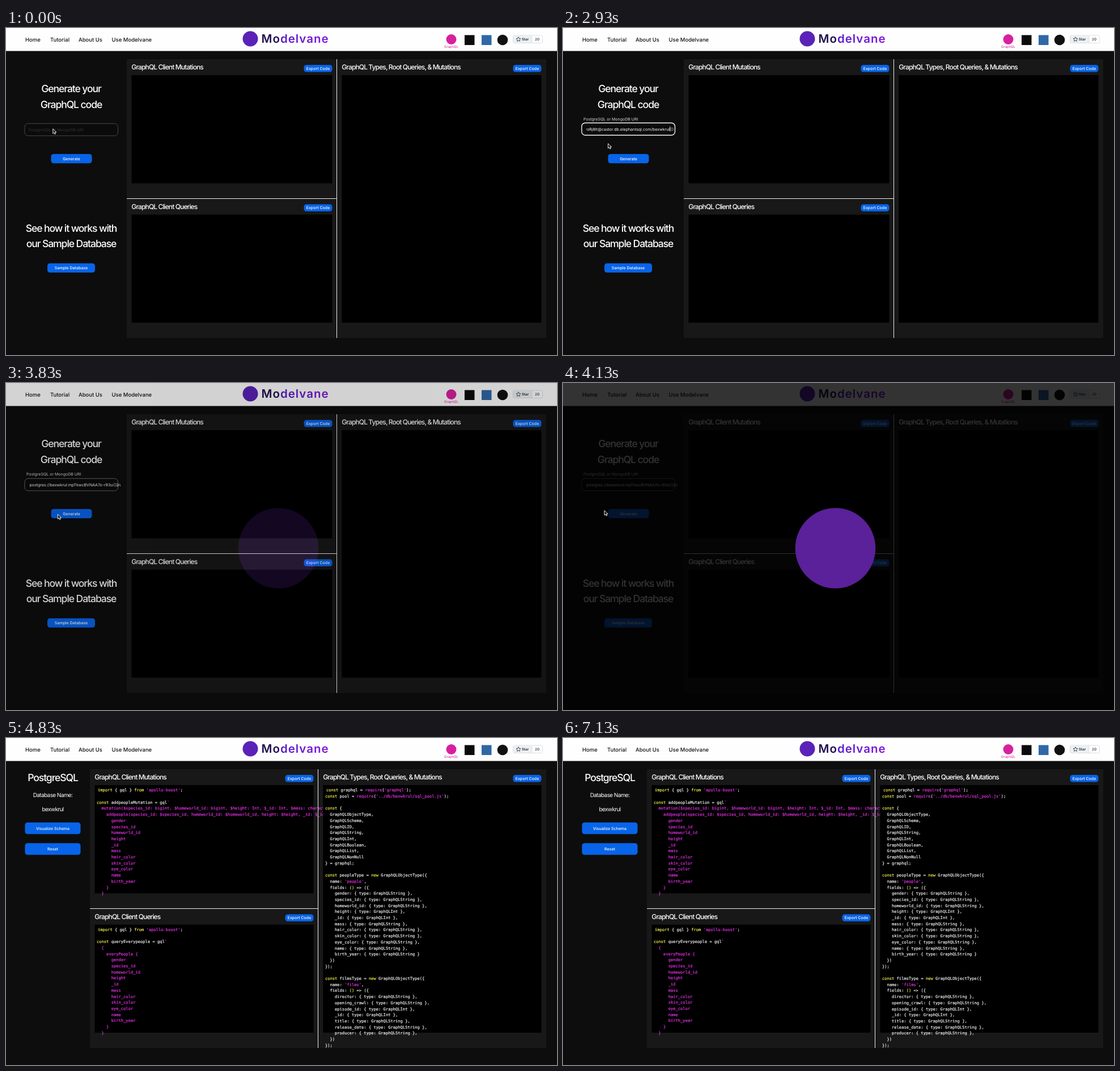
An HTML page that plays this animation: 972 px wide and 576 px high, repeating every 8000 ms.

```html
<!DOCTYPE html>
<html lang="en">
<head>
<meta charset="utf-8">
<title>GraphQL code generator</title>
<style>
html, body { margin: 0; width: 100%; height: 100%; overflow: hidden; background: #0d0d0d; }
svg { display: block; width: 972px; height: 576px; }
svg svg { width: auto; height: auto; }
text { font-family: Inter, "Open Sans", sans-serif; font-size: 7px; fill: #fff; white-space: pre; text-rendering: geometricPrecision; }
.nav { font-size: 9.5px; font-weight: 500; fill: #111; }
.brand { font-size: 20.5px; font-weight: 600; letter-spacing: 1px; fill: url(#purple); }
.title { font-size: 17.6px; font-weight: 500; letter-spacing: -1.1px; }
.head { font-size: 12px; font-weight: 500; letter-spacing: -.88px; }
.info { font-size: 10px; letter-spacing: -.6px; }
.btn { font-weight: 500; }
.mid { text-anchor: middle; }
.code { font-family: "DejaVu Sans Mono", monospace; font-size: 7.12px; fill: #f4f4f4; stroke: #f4f4f4; stroke-width: .18px; }
.key { fill: #f3f04e; stroke: #f3f04e; }
.str { fill: #e832e8; stroke: #e832e8; }
</style>
</head>
<body>
<svg id="stage" viewBox="0 0 972 576"></svg>
<script>
const BRAND = 'Modelvane', USER = 'bexwkrul', LOOP = 8000;
const BLUE = '#0864e8', PITCH = 10.7;

const rect = (x, y, w, h, fill, more = '') =>
  `<rect x="${x}" y="${y}" width="${w}" height="${h}" fill="${fill}" ${more}/>`;
const text = (x, y, cls, s, more = '') => `<text x="${x}" y="${y}" class="${cls}" ${more}>${s}</text>`;
const clip = (x, y, w, h, body) =>
  `<svg x="${x}" y="${y}" style="width:${w}px;height:${h}px">${body}</svg>`;
const button = (x, y, w, h, s, id = '') =>
  `<g id="${id}">${rect(x, y, w, h, BLUE, 'rx="4.5"')}${text(x + w / 2, y + h / 2 + 2.6, 'btn mid', s)}</g>`;

// Code samples
const people = ['gender', 'species_id', 'homeworld_id', 'height', '_id', 'mass',
  'hair_color', 'skin_color', 'eye_color', 'name', 'birth_year'];
const films = ['director', 'opening_crawl', 'episode_id', '_id', 'title', 'release_date', 'producer'];
const importLine = "import { gql } from 'apollo-boost';";
const picked = [...people.map(f => '      ' + f), '    }', '  }'];

const mutations = [importLine, '', 'const addpeopleMutation = gql`',
  '  mutation($species_id: bigint, $homeworld_id: bigint, $height: Int, $_id: Int, $mass: character varying) {',
  '    addpeople(species_id: $species_id, homeworld_id: $homeworld_id, height: $height, _id: $_id) {',
  ...picked];
const queries = [importLine, '', 'const queryEverypeople = gql`', '  {', '    everyPeople {', ...picked];

const typeDef = (name, fields) => [
  `const ${name}Type = new GraphQLObjectType({`, `  name: '${name}',`, '  fields: () => ({',
  ...fields.map(f => {
    const kind = /^(height|_id|episode_id)$/.test(f) ? 'Int' : 'String';
    return `    ${f}: { type: GraphQL${kind} }${f === 'birth_year' ? '' : ','}`;
  }), '  })', '});', ''];
const kinds = ['ObjectType', 'Schema', 'ID', 'String', 'Int', 'Boolean', 'List', 'NonNull'];
const types = ["const graphql = require('graphql');", `const pool = require('../db/${USER}/sql_pool.js');`, '',
  'const {', ...kinds.map((k, i) => `  GraphQL${k}${i < 7 ? ',' : ''}`), '} = graphql;', '',
  ...typeDef('people', people), ...typeDef('films', films)];

const paint = line => line.replace(/'[^']*'|`|require|\b(?:import|from|const|new)\b|\(\)/g, s =>
  `<tspan class="${/^['`r]/.test(s) ? 'str' : 'key'}">${s}</tspan>`);

function codeBox(x, y, w, h, lines, inTemplate) {
  const rows = lines.map((line, i) => {
    const tinted = inTemplate && i > 2;
    return text(3.7 + (i ? 0 : 2), 11.3 + i * PITCH, 'code',
      tinted ? `<tspan class="str">${line}</tspan>` : paint(line));
  }).join('');
  return clip(x, y, w, h, rect(0, 0, w, h, '#000') + rows);
}

function panels(left, split, code) {
  const x = left + 8.3, w = split - left - 16.3, x2 = split + 8.7, w2 = 944.5 - x2;
  const pane = (px, py, pw, ph, title, lines, tpl) =>
    text(px, py + 18.3, 'head', title) + button(px + pw - 50, py + 10, 50, 12.5, 'Export Code') +
    codeBox(px, py + 28, pw, ph, code ? lines : [], tpl);
  return rect(left, 55, 953 - left, 491, '#181818') +
    pane(x, 55, w, 190.5, 'GraphQL Client Mutations', mutations, true) +
    pane(x, 300.5, w, 190.5, 'GraphQL Client Queries', queries, true) +
    pane(x2, 55, w2, 436, 'GraphQL Types, Root Queries, &amp; Mutations', types, false) +
    rect(left, 300, split - left, 1, '#eee') + rect(split - .5, 55, 1, 491, '#eee');
}

const header = rect(0, 0, 972, 40.5, '#fefefe') +
  [[34, 'Home'], [78, 'Tutorial'], [128, 'About Us'], [186.5, 'Use ' + BRAND]]
    .map(([x, s]) => text(x, 24, 'nav', s)).join('') +
  '<circle cx="431" cy="19" r="13.5" fill="#5b22b8"/>' +
  text(450.5, 26, 'brand', `<tspan fill="#21104f">${BRAND.slice(0, 2)}</tspan>${BRAND.slice(2)}`) +
  '<circle cx="785.5" cy="20" r="9" fill="#d8209f"/>' +
  text(785.5, 35, 'mid', 'GraphQL', 'style="font-size:5.9px;fill:#d8209f"') +
  rect(809, 12.5, 17.5, 17.5, '#0b0b0b') + rect(839, 12.5, 17.5, 17.5, '#2f68a6') +
  '<circle cx="876" cy="21" r="9.3" fill="#111"/>' +
  rect(894.5, 13, 52, 13.5, '#fff', 'rx="2" stroke="#d5d9dd" stroke-width=".8"') +
  rect(895, 13.4, 33, 12.7, '#ebf0f4', 'rx="1.5"') + rect(927.5, 13.4, .7, 12.7, '#d0d4d8') +
  '<path d="M904 15.8l1.2 2.5 2.7.4-2 1.9.5 2.7-2.4-1.3-2.4 1.3.5-2.7-2-1.9 2.7-.4z" fill="none" stroke="#222" stroke-width=".8"/>' +
  text(916, 22.2, 'mid', 'Star', 'style="font-size:6.3px;font-weight:600;fill:#24292f"') +
  text(937, 22.2, 'mid', '20', 'style="font-size:6.3px;font-weight:500;fill:#24292f"');

const title = (x, y, s) => text(x - .5, y, 'title mid', s);

const form = title(115.5, 113, 'Generate your') + title(115.5, 140.5, 'GraphQL code') +
  `<g id="field">${rect(33, 168.3, 164.5, 21.5, '#0b0b0b', 'rx="6" id="frame"')}
   ${clip(41, 169, 147.5, 20, '<text id="uri" y="13"></text>')}
   <g id="clear"><circle cx="192" cy="179.3" r="3.4" fill="#4a4a4a"/>
   <path d="M190.7 178l2.6 2.6m0-2.6l-2.6 2.6" stroke="#111" stroke-width=".8"/></g>
   ${rect(0, 174.5, .8, 8.5, '#fff', 'id="caret"')}</g>` +
  text(0, 0, '', 'PostgreSQL or MongoDB URI', 'id="label"') +
  button(79.5, 222, 72, 16.3, 'Generate', 'generate') +
  title(115.5, 358.5, 'See how it works with') + title(115.5, 386.3, 'our Sample Database') +
  button(73, 414.5, 84, 16.3, 'Sample Database');

const result = title(83, 76.3, 'PostgreSQL') + text(82.5, 103.5, 'info mid', 'Database Name:') +
  text(82.5, 129, 'info mid', USER) +
  button(33.5, 148.7, 98, 20.6, 'Visualize Schema') + button(33.5, 185.2, 98, 20.6, 'Reset');

document.getElementById('stage').innerHTML =
  `<defs><linearGradient id="purple"><stop offset=".2" stop-color="#541fcb"/><stop offset="1" stop-color="#8416dc"/></linearGradient></defs>` +
  rect(0, 0, 972, 576, '#0d0d0d') + header +
  `<g id="before">${panels(213, 583.5, false)}${form}</g>` +
  `<g id="after">${panels(148, 550.5, true)}${result}</g>` +
  `<g id="loading">${rect(0, 0, 972, 576, '#000', 'fill-opacity=".8"')}<circle cx="480.5" cy="291" r="70.8" fill="#5a219a"/></g>` +
  `<g id="cursor"><path id="arrow" d="M0 0v8.4l2-1.8 1.3 3 1.5-.7-1.3-2.8h2.6z" fill="#111" stroke="#fff" stroke-width=".9"/>
   <path id="beam" d="M-1.6-4q1.6 0 1.6 1.2q0-1.2 1.6-1.2M0-3v6M-1.6 4q1.6 0 1.6-1.2q0 1.2 1.6 1.2" fill="none" stroke="#ddd" stroke-width=".9"/></g>`;

const $ = id => document.getElementById(id);
const show = (id, on) => $(id).setAttribute('display', on ? 'inline' : 'none');
const set = (id, attrs) => { for (const k in attrs) $(id).setAttribute(k, attrs[k]); };
const ramp = (t, a, b) => {
  const p = Math.min(1, Math.max(0, (t - a) / (b - a)));
  return p * p * (3 - 2 * p);
};
const mix = (a, b, p) => a + (b - a) * p;
const gray = v => `rgb(${v},${v},${v})`;

const uriStart = `postgres://${USER}:mpTkwcBVNAA7o-r93udQn`;
const uriEnd = `woRj8It@castor.db.elephantsql.com/${USER}`;

// time, x, y of the pointer
const path = [[0, 82.8, 177.5], [30, 82.8, 177.5], [430, 79, 177.5], [2770, 79, 177.5], [2930, 79.5, 203.5],
  [3400, 92.5, 231.5], [3780, 92.5, 231.5], [4130, 73, 224.5], [4500, 121, 212], [LOOP, 121, 212]];

function pointer(t) {
  const i = path.findIndex(k => k[0] > t), a = path[i - 1], b = path[i], p = ramp(t, a[0], b[0]);
  return [mix(a[1], b[1], p), mix(a[2], b[2], p)];
}

function draw(t) {
  const done = t >= 4830, pasted = t >= 1930, blur = t >= 3560;
  show('before', !done);
  show('after', done);

  const focus = blur ? 1 - ramp(t, 3560, 3680) : ramp(t, 700, 900);
  set('field', { transform: `translate(0 ${-focus})` });
  set('frame', { stroke: gray(mix(blur ? 112 : 78, 245, focus)), 'stroke-width': mix(.9, 1.4, focus) });

  const lift = ramp(t, 700, 900);
  set('label', { x: mix(40, 36, lift), y: mix(181.5, 162.5, lift) });
  $('label').style.fill = gray(mix(52, 215, lift));

  $('uri').textContent = !pasted ? '' : blur ? uriStart : uriEnd;
  set('uri', blur ? { x: .5, 'text-anchor': 'start' } : { x: 147, 'text-anchor': 'end' });
  show('clear', pasted);
  show('caret', !blur && t >= 700 && !(t >= 1200 && t < 1700) && !(t >= 2470 && t < 2900));
  set('caret', { x: pasted ? 188.3 : 42 });

  const press = ramp(t, 3580, 3680) - ramp(t, 3740, 3840);
  set('generate', {
    transform: `translate(115.5 230.1) scale(${1 - .03 * press}) translate(-115.5 -230.1)`,
    opacity: 1 - .17 * press
  });

  show('loading', t >= 3760 && !done);
  set('loading', { opacity: ramp(t, 3760, 4000) });

  const [x, y] = pointer(t), beam = t >= 150 && y < 190;
  show('cursor', !done && !(t >= 1470 && t < 2770));
  set('cursor', { transform: `translate(${x} ${y})` });
  show('beam', beam);
  show('arrow', !beam);
}

const start = performance.now();
function tick() {
  draw((performance.now() - start) % LOOP);
  requestAnimationFrame(tick);
}
tick();
</script>
</body>
</html>
```
